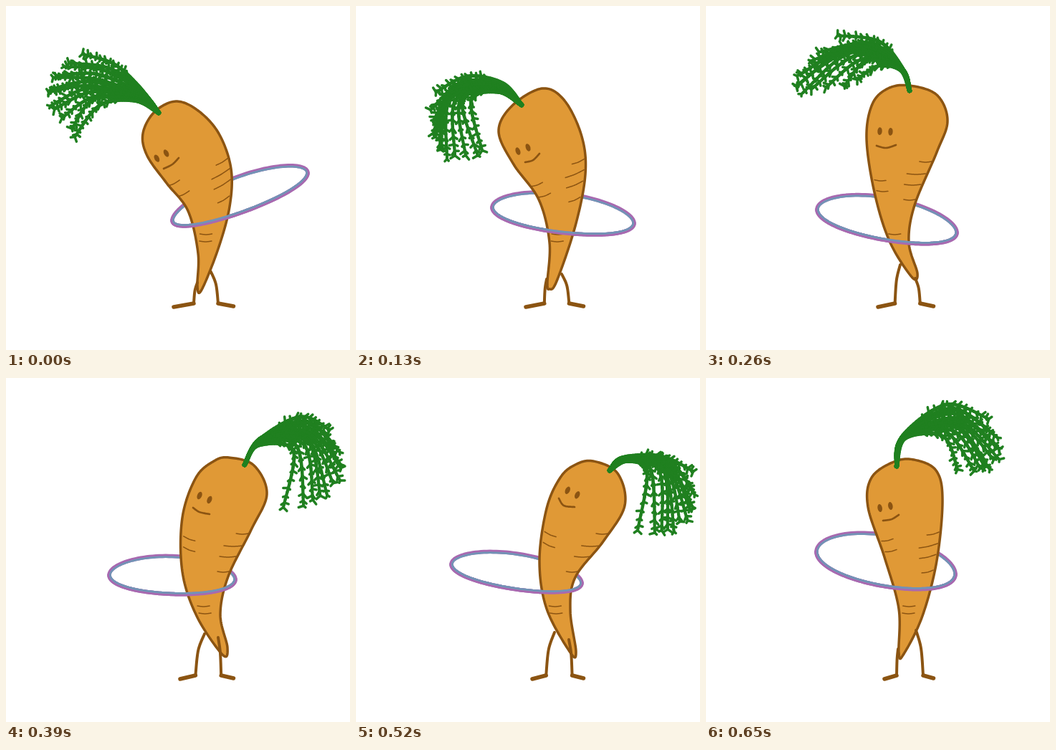
Recreate the animation shown at these times as an HTML page with a canvas. Size 480 px wide and 480 px high, loop 780 ms.

```html
<!DOCTYPE html>
<html>
<head>
<meta charset="utf-8">
<style>
html, body { margin: 0; height: 100%; overflow: hidden; background: #fff; }
canvas { display: block; }
</style>
</head>
<body>
<canvas width="480" height="480"></canvas>
<script>
const ctx = document.querySelector('canvas').getContext('2d');
const STEP = 130, FRONDS = 12;
const ORANGE = '#e09936', BROWN = '#8b5412', GREEN = '#208020', PURPLE = '#a869b0', BLUE = '#7194b6';

// Strings hold "x,y" key points. hoop: centre x, y, radius x, y, slant.
// fan: upper, middle and lower frond; the rest are interpolated.
const poses = [
  {
    lean: -.5, eyes: '217,209', mouth: '220,227 232,221 241,212', crease: 247,
    body: '237,133 268,146 297,178 314,227 312,280 296,339 273,396 267,391 268,345 254,286 224,247 197,209 191,178 207,148',
    hoop: [326.5, 266, 94.5, 26, -33], hips: '267,386 286,371', root: '213,149',
    fan: '185,112 150,80 103,67|190,128 120,108 64,118|180,132 130,137 100,185'
  },
  {
    lean: -.35, eyes: '233,200', mouth: '236,218 247,215 256,206', crease: 249,
    body: '260,115 291,132 315,182 320,235 306,307 280,384 270,395 267,386 270,330 255,270 220,221 199,175 218,139',
    hoop: [289, 292, 99, 27.5, 11], hips: '266,381 287,374', root: '231,138',
    fan: '205,108 155,97 108,120|195,116 130,128 120,200|200,120 160,130 180,204'
  },
  {
    lean: .05, eyes: '250,175', mouth: '238,195 251,198 265,194', crease: 243,
    body: '284,111 322,124 337,160 322,204 291,278 283,330 295,373 287,378 256,328 235,260 224,185 232,137 254,115',
    hoop: [252.5, 300, 97.5, 30, 16], hips: '271,361 292,380', root: '284,118',
    fan: '273,85 240,48 180,41|270,85 200,62 128,112|272,90 240,82 215,105'
  },
  {
    lean: .4, eyes: '277,167', mouth: '261,181 270,187 284,190', crease: 224,
    body: '311,111 346,122 364,162 342,212 310,277 299,330 309,376 302,386 266,332 246,270 246,195 265,139 290,116',
    hoop: [232, 278, 88, 26.5, 3], hips: '277,357 296,362', root: '333,121',
    fan: '355,85 410,53 448,72|357,84 425,80 464,145|352,94 400,100 391,183'
  },
  {
    lean: .45, eyes: '302,160', mouth: '283,168 290,178 305,180', crease: 218,
    body: '331,116 365,133 375,178 345,228 306,278 299,325 307,382 299,383 266,322 256,255 266,182 285,139 306,121',
    hoop: [224, 273, 91, 25, 13], hips: '277,355 297,365', root: '354,129',
    fan: '372,111 425,108 467,130|375,113 435,125 460,200|378,116 405,130 397,215'
  },
  {
    lean: -.2, eyes: '250,180', mouth: '247,199 259,197 269,191', crease: 226,
    body: '290,114 321,129 330,170 322,255 302,332 276,385 269,384 269,322 249,250 226,180 231,139 262,117',
    hoop: [251, 258, 97, 36, 15.5], hips: '268,378 293,352', root: '266,123',
    fan: '275,80 335,36 391,57|275,84 350,60 408,114|278,84 330,80 355,130'
  }
];

const parse = s => s.split(' ').map(p => p.split(',').map(Number));

// Dense points of a Catmull-Rom curve
function curve(pts, closed) {
  const n = pts.length, out = [];
  const at = i => closed ? pts[(i + n) % n] : pts[Math.max(0, Math.min(n - 1, i))];
  for (let i = 0; i < (closed ? n : n - 1); i++) {
    const [a, b, c, d] = [-1, 0, 1, 2].map(k => at(i + k));
    for (let t = 0; t < 1; t += 1 / 16)
      out.push([0, 1].map(k => b[k] + t / 2 * (c[k] - a[k] +
        t * (2 * a[k] - 5 * b[k] + 4 * c[k] - d[k] + t * (3 * (b[k] - c[k]) + d[k] - a[k])))));
  }
  out.push(closed ? pts[0] : pts[n - 1]);
  return out;
}

function trace(pts) {
  ctx.beginPath();
  pts.forEach(p => ctx.lineTo(...p));
}

function line(pts, color, width) {
  trace(pts);
  ctx.strokeStyle = color;
  ctx.lineWidth = width;
  ctx.stroke();
}

// Slanted, slightly bowed ellipse; turn .5 gives the front half
function drawHoop([cx, cy, rx, ry, slant], turn) {
  const arc = part => Array.from({ length: 121 }, (_, i) => {
    const a = i / 120 * part * 2 * Math.PI, s = Math.sin(a), c = Math.cos(a);
    return [cx + rx * c, cy + slant * c + ry * s - 3 * s * s];
  });
  ctx.save();
  line(arc(turn), PURPLE, 5.5);
  trace(arc(1));
  ctx.clip();
  line(arc(turn), BLUE, 5.5);
  ctx.restore();
}

function drawCreases(body, lean, top) {
  const edges = y => {
    const xs = body.filter(p => Math.abs(p[1] - y) < 3).map(p => p[0]);
    return [Math.min(...xs), Math.max(...xs)];
  };
  const crease = (x, y, len, tilt) => line(curve([-.5, 0, .5].map(k =>
    [x + k * len, y + k * len * tilt + (k ? 0 : 1)])), BROWN, 1.5);
  [217, 234, 249, 270].forEach((y, i) => {
    const len = [17, 26, 23, 16][i];
    crease(edges(y)[1] - len / 2 - 2, y, len, Math.min(lean, 0) * 1.2);
  });
  for (const y of [top, top + 15]) crease(edges(y)[0] + 12, y, 16, lean);
  for (const y of [318, 328]) {
    const [l, r] = edges(y);
    crease((l + r) / 2 - 4, y, 17, 0);
  }
}

function drawLegs(hips, step) {
  const feet = [
    [[262 + .8 * step, 415], [234 + 3 * step, 420]],
    [[296 + 1.4 * step, 415], [317.5, 419]]
  ];
  feet.forEach(([ankle, toe], i) => {
    const [x, y] = hips[i];
    line(curve([[x, y], [x + .7 * (ankle[0] - x), y + .4 * (ankle[1] - y)], ankle]), BROWN, 4);
    line([ankle, toe], BROWN, 5.5);
  });
}

function drawFace(pose) {
  const [x, y] = parse(pose.eyes)[0], { lean } = pose;
  ctx.fillStyle = BROWN;
  for (const d of [-7.5, 7.5]) {
    ctx.beginPath();
    ctx.ellipse(x + d * Math.cos(lean), y + d * Math.sin(lean), 3.2, 5.5, lean, 0, 7);
    ctx.fill();
  }
  line(curve(parse(pose.mouth)), BROWN, 2.7);
}

function drawLeaves(pose) {
  let seed = 4711;
  const rand = () => (seed = (seed * 16807) % 2147483647) / 2147483647;
  const root = parse(pose.root)[0], keys = pose.fan.split('|').map(parse);
  for (let f = 0; f < FRONDS; f++) {
    const t = f / (FRONDS - 1);
    const mix = [(2 * t - 1) * (t - 1), 4 * t * (1 - t), t * (2 * t - 1)];
    const pts = [0, 1, 2].map(i => [0, 1].map(k =>
      mix.reduce((sum, m, j) => sum + m * keys[j][i][k], 0) + (rand() - .5) * 5 * i));
    const stem = curve([root, ...pts]), n = stem.length;
    for (let i = 1; i < n; i++) {
      const [x, y] = stem[i], [px, py] = stem[i - 1], u = i / n;
      line([[px, py], [x, y]], GREEN, 6.5 - 2.5 * u);
      if (u < .45 || i % 2) continue;
      const dir = Math.atan2(y - py, x - px);
      for (const side of [-1, 1]) {
        const a = dir + side * (.5 + rand()), len = 3 + 5 * rand();
        line([[x, y], [x + len * Math.cos(a), y + len * Math.sin(a)]], GREEN, 3.5);
      }
    }
  }
}

function draw(step) {
  const pose = poses[step];
  ctx.fillStyle = '#fff';
  ctx.fillRect(0, 0, 480, 480);
  ctx.lineCap = ctx.lineJoin = 'round';
  drawHoop(pose.hoop, 1);
  const body = curve(parse(pose.body), true);
  trace(body);
  ctx.fillStyle = ORANGE;
  ctx.fill();
  line(body, BROWN, 3.5);
  drawCreases(body, pose.lean, pose.crease);
  drawLegs(parse(pose.hips), step);
  drawFace(pose);
  drawHoop(pose.hoop, .5);
  drawLeaves(pose);
}

let shown = -1;
function tick() {
  const step = Math.floor(performance.now() / STEP) % poses.length;
  if (step !== shown) draw(shown = step);
  requestAnimationFrame(tick);
}
tick();
</script>
</body>
</html>
```
